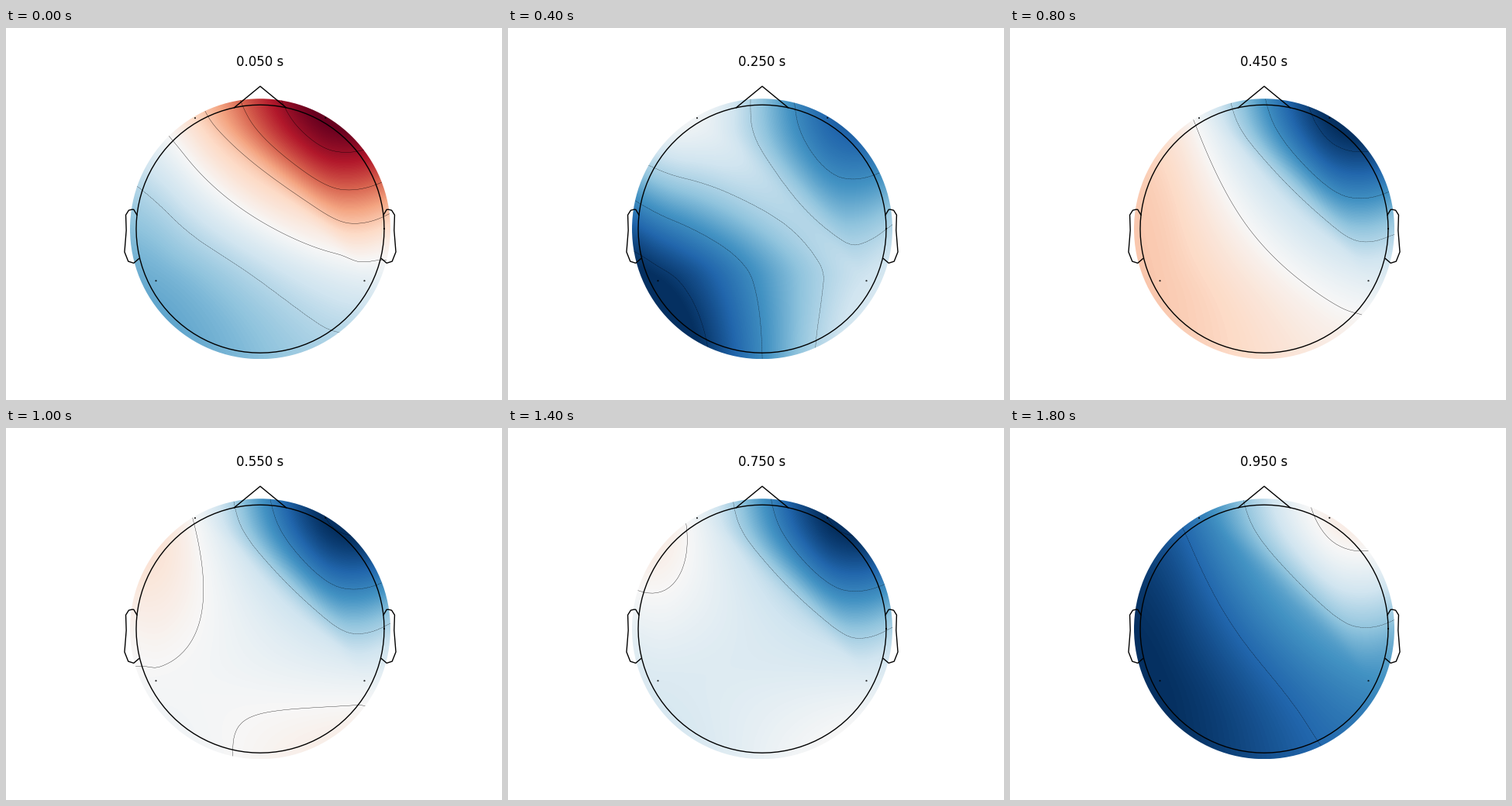
A matplotlib script that plays this animation: 640x480 px, repeating every 2 s.

```python
import numpy as np
import matplotlib.pyplot as plt
from matplotlib.animation import FuncAnimation
from matplotlib.patches import Circle
from matplotlib.tri import Triangulation

W, H, DPI = 640, 480, 100
CX, CY = 328, 259.2      # head centre, pixels from the top left
HEAD, CLIP = 160, 168    # head outline and coloured disc radii
RES, STEPS = 64, 10

# Electrodes relative to the head centre, y up; one is nudged off the
# common circle so that the triangulation is unique.
SENSORS = np.array([(-84, 143), (84.3, 143.3), (-134.5, -67), (134.5, -67)])
N = len(SENSORS)

# Electrode signals at key steps, in units of the contour spacing.
KEYS = {
    0: (0.70, 3.50, -1.70, -0.35),
    1: (0.15, 3.40, 1.42, 0.15),
    2: (-0.13, -2.50, -3.18, -0.63),
    4: (-0.12, -3.25, 0.85, -0.35),
    6: (0.03, -3.12, -0.88, -0.13),
    8: (-0.42, -3.45, 0.00, -0.66),
    9: (-1.77, 0.13, -2.55, -1.57),
}

# Mesh: electrodes plus a ring of twelve outer points.
ring = np.arange(12) * np.pi / 6
nodes = np.vstack([SENSORS, 427 * np.c_[np.cos(ring), np.sin(ring)]])
mesh = Triangulation(nodes[:, 0], nodes[:, 1])
links = np.vstack([mesh.edges, mesh.edges[:, ::-1]])


def node_values():
    """Unit response of every node to each electrode; outer nodes average."""
    values = np.zeros((len(nodes), N))
    values[:N] = np.eye(N)
    for i in range(N, len(nodes)):
        near = [b for a, b in links if a == i and b < N]
        if near:
            values[i] = values[near].mean(axis=0)
    return values


def node_gradients(values):
    """Gradients that minimise the curvature along all mesh edges."""
    n = len(nodes)
    lhs = np.zeros((n, 2, n, 2))
    rhs = np.zeros((n, 2, N))
    for i, j in links:
        e = nodes[j] - nodes[i]
        cube = np.linalg.norm(e) ** 3
        ee = np.outer(e, e) / cube
        lhs[i, :, i] += 4 * ee
        lhs[i, :, j] += 2 * ee
        rhs[i] += 6 * np.outer(e, values[j] - values[i]) / cube
    flat = np.linalg.solve(lhs.reshape(2 * n, 2 * n), rhs.reshape(2 * n, N))
    return flat.reshape(n, 2, N)


values = node_values()
grads = node_gradients(values)


def barycentric(corners, points):
    lhs = np.vstack([corners.T, np.ones(3)])
    return np.linalg.solve(lhs, np.vstack([points.T, np.ones(len(points))])).T


def patch(t, points):
    """Clough-Tocher cubic on one triangle."""
    ids = mesh.triangles[t]
    p, f = nodes[ids], values[ids]
    c = np.array([[f[i] + (p[j] - p[i]) @ grads[ids[i]] / 3
                   for j in range(3)] for i in range(3)])
    near = c.sum(axis=1) / 3
    mid = np.zeros((3, N))
    for k in range(3):
        i, j = (k + 1) % 3, (k + 2) % 3
        other = mesh.neighbors[t, i]
        g = -0.5
        if other >= 0:
            centroid = nodes[mesh.triangles[other]].mean(axis=0)
            b = barycentric(p, centroid[None])[0]
            g = (2 * b[j] + b[i] - 1) / (2 - 3 * b[j] - 3 * b[i])
        mid[k] = (g * (-f[i] + 3 * c[i, j] - 3 * c[j, i] + f[j])
                  - f[i] + 2 * c[i, j] - c[j, i] + near[i] + near[j]) / 2
    hub = (near + mid.sum(axis=0) - mid) / 3
    core = hub.mean(axis=0)

    b = barycentric(p, points)
    low = b.min(axis=1, keepdims=True)
    r, z = (b - low).T[:, :, None], 3 * low
    out = z ** 3 * core
    for i in range(3):
        j, k = (i + 1) % 3, (i + 2) % 3
        out = out + (r[i] ** 3 * f[i]
                     + 3 * r[i] ** 2 * (r[j] * c[i, j] + r[k] * c[i, k])
                     + 3 * r[i] ** 2 * z * near[i]
                     + 3 * r[i] * z ** 2 * hub[i]
                     + 6 * r[j] * r[k] * z * mid[i])
    return out


def weights(points):
    """Contribution of each electrode at the given points."""
    owner = mesh.get_trifinder()(points[:, 0], points[:, 1])
    out = np.zeros((len(points), N))
    for t in np.unique(owner):
        mine = owner == t
        out[mine] = patch(t, points[mine])
    return out


def unit(v):
    return v / np.abs(v).max()


# Steps between two keys take the mean of their normalised neighbours.
signals = {k: np.array(v) for k, v in KEYS.items()}
for k in range(STEPS):
    if k not in signals:
        signals[k] = 3 * unit(unit(signals[k - 1]) + unit(signals[k + 1]))

axis = np.linspace(-CLIP, CLIP, RES)
gx, gy = np.meshgrid(axis, axis)
grid = weights(np.c_[gx.ravel(), gy.ravel()])

fig = plt.figure(figsize=(W / DPI, H / DPI), dpi=DPI, facecolor="white")
ax = fig.add_axes([0, 0, 1, 1])
image = ax.imshow(np.zeros((RES, RES)), cmap="RdBu_r", origin="lower",
                  extent=(-CLIP, CLIP, -CLIP, CLIP), aspect="auto",
                  interpolation="bilinear")
ax.set_xlim(-CX, W - CX)
ax.set_ylim(CY - H, CY)
ax.axis("off")
disc = Circle((0, 0), CLIP, transform=ax.transData)
image.set_clip_path(disc)


def outline(x, y):
    ax.plot(HEAD * np.asarray(x), HEAD * np.asarray(y), color="k", lw=1)


turn = np.linspace(0, 2 * np.pi, 101)
outline(np.cos(turn), np.sin(turn))
nose = np.arccos(np.deg2rad(12))
outline([-np.cos(nose), 0, np.cos(nose)], [np.sin(nose), 1.15, np.sin(nose)])
ear_x = 2 * np.array([.497, .510, .518, .530, .542, .540, .547, .532, .510, .489])
ear_y = 2 * np.array([.056, .078, .078, .075, .056,
                      -.006, -.093, -.131, -.138, -.120])
outline(ear_x, ear_y)
outline(-ear_x, ear_y)
ax.scatter(*SENSORS.T, s=0.25, marker="o", edgecolor="k", facecolor="none",
           zorder=3)
title = ax.text(0, CY - 49.3, "", ha="center", va="baseline", fontsize=12,
                family="DejaVu Sans")
contours = []


def draw(step):
    signal = signals[step]
    field = (grid @ signal).reshape(RES, RES)
    peak = np.abs(signal).max()
    image.set_data(field)
    image.set_clim(-peak, peak)
    while contours:
        contours.pop().remove()
    lines = ax.contour(gx, gy, field, levels=np.arange(-3, 4), colors="k",
                       linewidths=0.25)
    lines.set_clip_path(disc)
    contours.append(lines)
    title.set_text(f"{0.05 + 0.1 * step:.3f} s")
    return image, title


anim = FuncAnimation(fig, draw, frames=STEPS, interval=200, repeat=True,
                     repeat_delay=0, blit=False)
plt.show()
```
